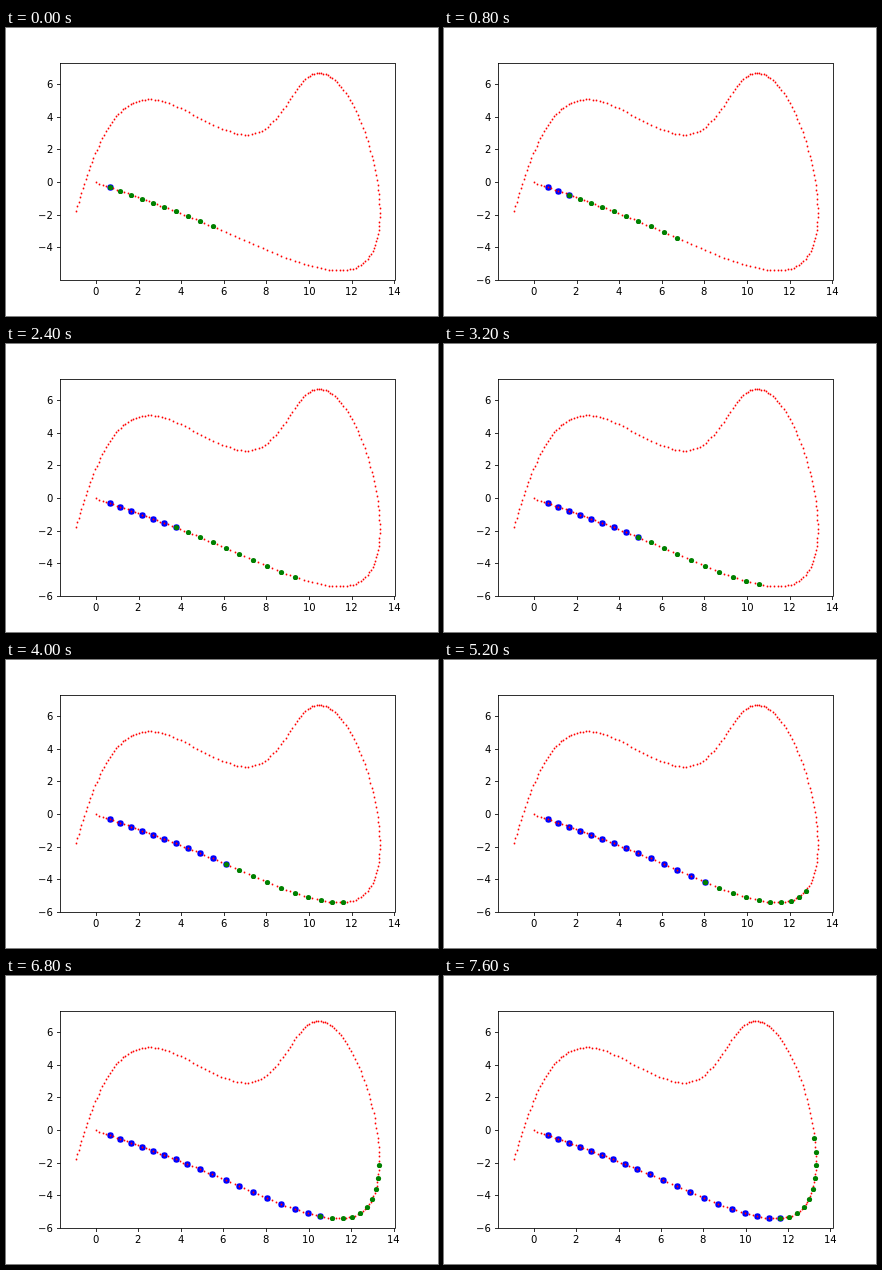
An HTML page with a canvas for the animation above (8000 ms loop, 432 px wide and 288 px high).

```html
<!DOCTYPE html>
<html>
<head>
<meta charset="utf-8">
<style>
  html, body { margin: 0; width: 100%; height: 100%; overflow: hidden; background: #fff; }
  canvas { display: block; }
</style>
</head>
<body>
<canvas id="stage" width="432" height="288"></canvas>
<script>
const ctx = document.getElementById('stage').getContext('2d');
const STEP = 400, STEPS = 20, AHEAD = 10;
const BOX = { left: 54.5, top: 35.5, right: 389.5, bottom: 252.5 };
const ORIGIN = { x: 89.9, y: 154.3 }, SCALE_Y = 16.33;

// Course waypoints, joined by a natural cubic spline over chord length
const wayX = [0, 6, 12.5, 10, 7.5, 3, -1];
const wayY = [0, -3, -5, 6.5, 3, 5, -2];
const knots = [0];
for (let i = 1; i < wayX.length; i++)
  knots[i] = knots[i - 1] + Math.hypot(wayX[i] - wayX[i - 1], wayY[i] - wayY[i - 1]);

function spline(t, v) {
  const n = t.length, m = Array(n).fill(0), c = [0], d = [0];
  for (let i = 1; i < n - 1; i++) {
    const h0 = t[i] - t[i - 1], h1 = t[i + 1] - t[i];
    const rhs = 6 * ((v[i + 1] - v[i]) / h1 - (v[i] - v[i - 1]) / h0);
    const w = 2 * (h0 + h1) - h0 * c[i - 1];
    c[i] = h1 / w;
    d[i] = (rhs - h0 * d[i - 1]) / w;
  }
  for (let i = n - 2; i > 0; i--) m[i] = d[i] - c[i] * m[i + 1];
  return s => {
    let i = 0;
    while (i < n - 2 && s > t[i + 1]) i++;
    const h = t[i + 1] - t[i], a = (t[i + 1] - s) / h, b = 1 - a;
    return a * v[i] + b * v[i + 1] + ((a ** 3 - a) * m[i] + (b ** 3 - b) * m[i + 1]) * h * h / 6;
  };
}

const courseX = spline(knots, wayX), courseY = spline(knots, wayY);
const course = [];
for (let s = 0; s < knots.at(-1); s += 0.2) course.push([courseX(s), courseY(s)]);

// The vehicle advances three course dots per step
const track = course.filter((_, i) => i % 3 === 1).slice(1);

function line(x1, y1, x2, y2) {
  ctx.beginPath();
  ctx.moveTo(x1, y1);
  ctx.lineTo(x2, y2);
  ctx.stroke();
}

// Text starts on a whole pixel; align is the share of its width left of x
function label(v, x, y, align) {
  const text = String(v).replace('-', '\u2212');
  ctx.fillText(text, Math.round(x - ctx.measureText(text).width * align), y);
}

function draw(k) {
  // The x axis widens as the plan rounds the far bend
  const scaleX = (298.3 - 0.6 * Math.max(0, k - 16)) / 14;
  const px = x => ORIGIN.x + x * scaleX, py = y => ORIGIN.y - y * SCALE_Y;
  const snap = v => Math.round(v) + 0.5;
  const dots = (points, r, color) => {
    ctx.fillStyle = color;
    for (const [x, y] of points) {
      ctx.beginPath();
      ctx.arc(snap(px(x)), snap(py(y)), r, 0, 7);
      ctx.fill();
    }
  };

  ctx.fillStyle = '#fff';
  ctx.fillRect(0, 0, 432, 288);
  dots(track.slice(0, k + 1), 3.2, '#00f');
  dots(course, 0.9, '#f00');
  dots(track.slice(k, k + AHEAD), 2.6, '#008000');

  ctx.strokeStyle = ctx.fillStyle = '#000';
  ctx.lineWidth = 0.8;
  ctx.strokeRect(BOX.left, BOX.top, BOX.right - BOX.left, BOX.bottom - BOX.top);
  ctx.font = '10px "DejaVu Sans", sans-serif';
  for (let v = 0; v <= 14; v += 2) {
    const x = snap(px(v));
    line(x, BOX.bottom, x, BOX.bottom + 3.5);
    label(v, px(v), 267, 0.5);
  }
  for (let v = k < 2 ? -4 : -6; v <= 6; v += 2) {
    const y = snap(py(v) - 0.2);
    line(BOX.left, y, BOX.left - 3.5, y);
    label(v, 47, y + 3.5, 1);
  }
}

function tick(now) {
  draw(Math.floor(now / STEP) % STEPS);
  requestAnimationFrame(tick);
}
requestAnimationFrame(tick);
</script>
</body>
</html>
```
